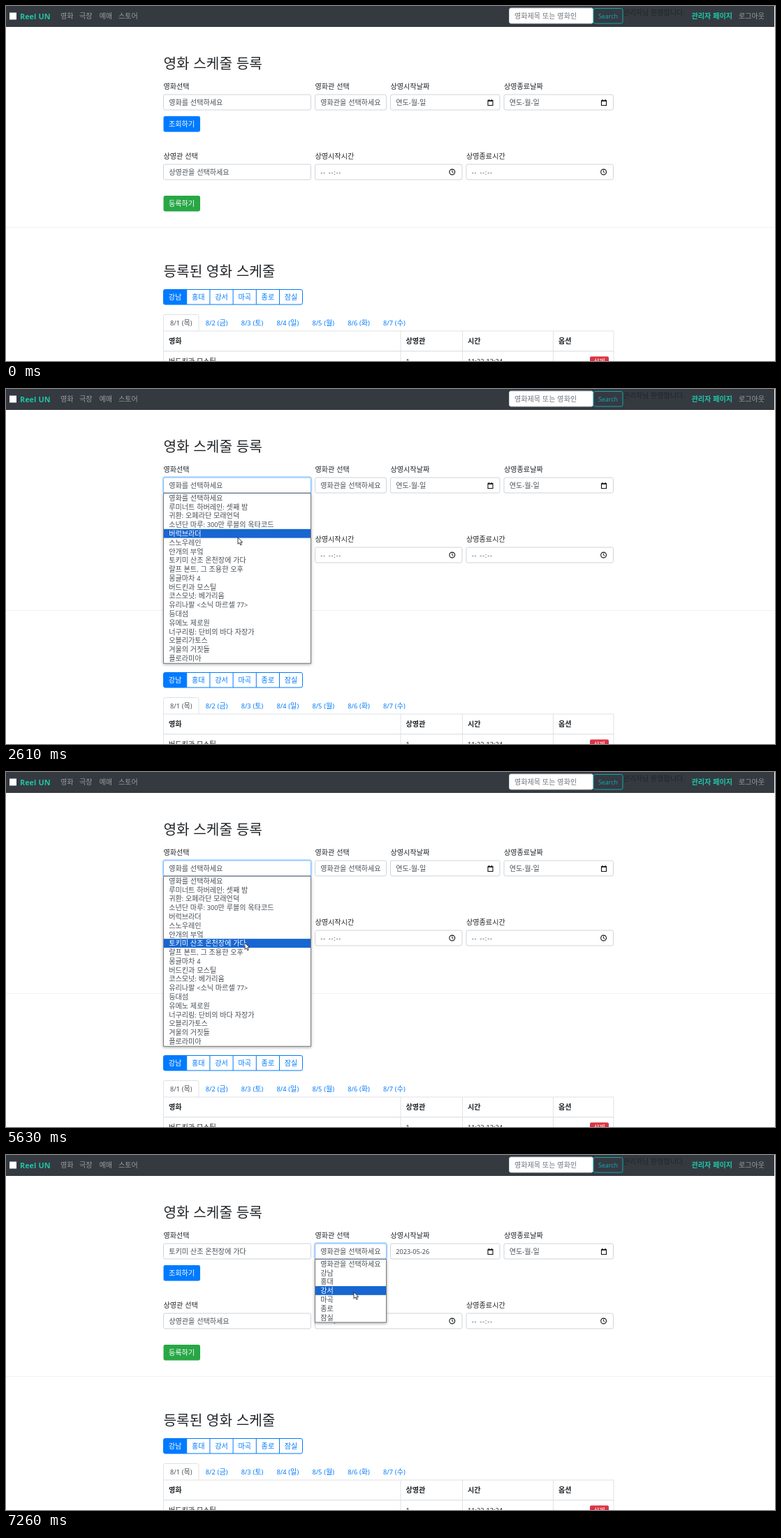
An HTML page for the animation above (8000 ms loop, 1101x509 px).

```html
<!DOCTYPE html>
<html lang="ko">
<head>
<meta charset="utf-8">
<title>영화 스케줄 등록</title>
<style>
  html, body { margin: 0; width: 100%; height: 100%; overflow: hidden; background: #fff; }
  svg { display: block; width: 100%; height: 100%; }
  text { font: 10.1px "Noto Sans CJK KR", "Noto Sans CJK", sans-serif; white-space: pre; }
  .latin { font-family: "Noto Sans", sans-serif; font-size: .91em; }
  .field { fill: #fff; stroke: #ced4da; }
  .ring { fill: none; stroke: rgba(0, 123, 255, .25); stroke-width: 2; }
  .focus .field { stroke: #80bdff; }
  .field-box:not(.focus) .ring { display: none; }
  .popup { filter: drop-shadow(0 1px 2px rgba(0, 0, 0, .35)); }
  .row rect { fill: none; }
  .row text { fill: #495057; }
  .row.on rect { fill: #1766d1; }
  .row.on text { fill: #fff; }
</style>
</head>
<body>
<svg id="stage" viewBox="0 0 1101 509" xmlns="http://www.w3.org/2000/svg"></svg>
<script>
const stage = document.getElementById('stage');
const INK = '#212529', GRAY = '#495057', NAV = '#999da0', BLUE = '#007bff', TEAL = '#20c4a8', LINE = '#dee2e6';

function add(tag, attrs = {}, parent = stage) {
  const el = document.createElementNS(stage.namespaceURI, tag);
  for (const key in attrs) el.setAttribute(key, attrs[key]);
  return parent.appendChild(el);
}

// Latin runs use a slightly smaller face than Hangul runs.
function setText(el, str) {
  el.textContent = '';
  str.split(/([\w\/().:<>,-]+)/).filter(Boolean).forEach(part => {
    const span = add('tspan', /[\w\/().:<>,-]/.test(part) ? { class: 'latin' } : {}, el);
    span.textContent = part;
  });
}

// Places text by its left edge and vertical centre.
function label(str, x, cy, { fill = GRAY, size = 10.1, weight = 400, gap = 0, anchor = 'start', parent = stage } = {}) {
  const el = add('text', {
    x, y: cy + size * .37, fill, 'text-anchor': anchor,
    style: `font-size:${size}px;font-weight:${weight};letter-spacing:${gap}px`
  }, parent);
  setText(el, str);
  return el;
}

const box = (x, y, width, height, fill, rx = 0, extra = {}, parent = stage) =>
  add('rect', { x, y, width, height, fill, rx, ...extra }, parent);
const line = (d, stroke = LINE, width = 1, extra = {}) =>
  add('path', { d, stroke, 'stroke-width': width, fill: 'none', ...extra });

function field(x, right, y, str, gap = 0) {
  const g = add('g', { class: 'field-box' });
  box(x - 1, y - 1, right - x + 2, 24, 'none', 3.2, { class: 'ring' }, g);
  box(x, y, right - x, 22, '#fff', 2.4, { class: 'field' }, g);
  return { g, text: label(str, x + 7.7, y + 11, { gap, parent: g }) };
}

function button(str, y, fill) {
  box(225.5, y, 52.5, 22.5, fill, 2.4);
  label(str, 233, y + 11.2, { fill: '#fff' });
}

function calendar(x) {
  line(`M${x + .5} 135.5h7v7h-7zM${x} 136.3h8M${x + 2} 133.8v2M${x + 6} 133.8v2`, '#111', 1.1);
}

function clock(x) {
  add('circle', { cx: x, cy: 238, r: 3.9, fill: 'none', stroke: '#111', 'stroke-width': 1.1 });
  line(`M${x} 235.6v2.6l1.8 1.2`, '#111');
}

function popup(x, width, items) {
  const step = 12.78, height = items.length * step + 1;
  const g = add('g', { class: 'popup' });
  box(x, 149.5, width, height, '#fff', 0, { stroke: '#777a7d' }, g);
  const rows = items.map((str, i) => {
    const y = 149.7 + i * step, row = add('g', { class: 'row' }, g);
    box(x + .5, y, width - 1, step, 'none', 0, {}, row);
    const text = label(str, x + 7.7, y + 6.4, { parent: row });
    text.removeAttribute('fill');
    return row;
  });
  return (open, active) => {
    g.style.display = open ? '' : 'none';
    rows.forEach((row, i) => row.classList.toggle('on', i === active - 1));
  };
}

const pickMovie = '영화를 선택하세요', pickCinema = '영화관을 선택하세요', noDate = '연도-월-일';
const cinemas = ['강남', '홍대', '강서', '마곡', '종로', '잠실'];
const movies = ['루미너트 하버레인: 셋째 밤', '귀환: 오페라단 모래언덕', '소년단 마루: 300만 루블의 옥타코드',
  '버럭브라더', '스노우레인', '안개의 부엌', '토키미 산조 온천장에 가다', '랄프 본트, 그 조용한 오후',
  '몽글마차 4', '버드킨과 모스틸', '코스모넛: 베가리움', '유리나팔 <소닉 마르셀 77>', '등대섬',
  '유메노 제로원', '너구리링: 단비의 바다 자장가', '오블리가토스', '겨울의 거짓들', '플로라미아'];

// Navigation bar
box(0, 0, 1100, 30, '#343a40');
box(5, 9.5, 10, 10, '#fff');
label('Reel UN', 20, 14.3, { fill: TEAL, size: 11.9, weight: 700 });
[['영화', 78], ['극장', 105], ['예매', 133.5], ['스토어', 161], ['로그아웃', 1049]]
  .forEach(([str, x]) => label(str, x, 14, { fill: NAV }));
label('관리자님 환영합니다.', 883.5, 9, { fill: INK, size: 10 });
box(720.5, 3, 120, 22, '#fff', 2.4, { stroke: '#ced4da' });
label('영화제목 또는 영화인', 728, 14, { fill: '#6c757d' });
box(841, 3.5, 42, 21.5, '#343a40', 2.4, { stroke: '#17a2b8' });
label('Search', 848, 14, { fill: '#17a2b8', size: 9.7 });
label('관리자 페이지', 981.5, 14, { fill: TEAL, weight: 700 });

// Registration form
label('영화 스케줄 등록', 225.5, 83, { fill: INK, size: 20.2 });
[['영화선택', 225.5, 115], ['영화관 선택', 442.5, 115], ['상영시작날짜', 550.5, 115], ['상영종료날짜', 713, 115],
 ['상영관 선택', 225.5, 215], ['상영시작시간', 442.5, 215], ['상영종료시간', 659, 215]]
  .forEach(([str, x, y]) => label(str, x, y, { fill: INK }));
const movieField = field(225.5, 436.5, 127, pickMovie);
const cinemaField = field(442.5, 544.5, 127, pickCinema);
const startField = field(550.5, 707, 127, noDate);
field(713, 869.5, 127, noDate);
calendar(689.5);
calendar(852);
button('조회하기', 158, BLUE);
field(225.5, 436.5, 227, '상영관을 선택하세요');
field(442.5, 653, 227, '-- --:--', .9);
field(659, 869.5, 227, '-- --:--', .9);
clock(638.8);
clock(855.6);
button('등록하기', 272, '#28a745');
line('M0 317.5H1100', '#f0f0f0');

// Registered schedule
label('등록된 영화 스케줄', 225.5, 380.5, { fill: INK, size: 20.2 });
box(225.5, 406.5, 199, 21.5, '#fff', 2.4, { stroke: BLUE });
box(225.5, 406.5, 33.2, 21.5, BLUE, 2);
cinemas.forEach((str, i) => {
  const x = 225.5 + i * 33.2;
  if (i) line(`M${x} 406.5v21.5`, BLUE);
  label(str, x + 16.6, 417.3, { fill: i ? BLUE : '#fff', anchor: 'middle' });
});
line('M225.5 466V445q0-2.5 2.5-2.5H273.5q2.5 0 2.5 2.5V466H870');
[...'목금토일월화수'].forEach((day, i) =>
  label(`8/${i + 1} (${day})`, 235 + i * 50.85, 454.3, { fill: i ? BLUE : GRAY }));
line('M225.5 466V509M565 466V509M653.5 466V509M783.5 466V509M870 466V509M225.5 466H276');
line('M225.5 494.8H870', LINE, 1.3);
[['영화', 233], ['상영관', 572.5], ['시간', 661], ['옵션', 791]]
  .forEach(([str, x]) => label(str, x, 480.5, { fill: INK, weight: 700 }));
[[movies[9], 233], ['1', 572.5], ['11:22-13:24', 661]]
  .forEach(([str, x]) => label(str, x, 509, { fill: INK }));
box(836, 502.5, 27, 18, '#dc3545', 2);
label('삭제', 841.5, 510, { fill: '#fff', size: 8.8 });

const showMovies = popup(225.5, 211, [pickMovie, ...movies]);
const showCinemas = popup(442.5, 102, [pickCinema, ...cinemas]);
const cursor = add('path', {
  d: 'M0 0V9.3L2.2 7.4L3.8 10.8L5.3 10.1L3.8 6.8H6.7Z',
  fill: '#fff', stroke: '#111', 'stroke-width': .8, 'stroke-linejoin': 'round'
});

// Stepped tracks: each entry holds until the next one.
const movieRow = [[0, 1], [1000, 4], [1110, 5], [1390, 6], [1710, 5], [2710, 6], [2810, 7], [3110, 8], [4320, 7], [5630, 8]];
const cinemaRow = [[0, 1], [6940, 2], [7050, 3], [7150, 4]];
const stops = [[800, 336, 141], [900, 335, 160], [1000, 334, 204], [1110, 333, 209], [1290, 333, 216], [1390, 333, 222],
  [1710, 332, 212], [2610, 332, 213], [2710, 335, 228], [2810, 339, 238], [3110, 340.5, 242], [3810, 340.5, 241],
  [3910, 340.5, 240], [4010, 340.5, 241.5], [4320, 340.5, 240], [4530, 341, 238.5], [5630, 342, 245]];
const glides = [
  { from: 100, to: 800, steps: 7, a: [1008, 466], b: [336, 141] },
  { from: 5940, to: 6360, steps: 4, a: [342, 245], b: [488, 138] },
  { from: 6360, to: 6640, steps: 3, a: [488, 138], b: [491, 146] },
  { from: 6740, to: 7260, steps: 5, a: [491, 146], b: [498, 196.5] }
];
const hold = (track, t) => track.reduce((last, entry) => entry[0] <= t ? entry : last);

function cursorAt(t) {
  const glide = glides.filter(g => g.from <= t).pop();
  if (!glide || (t >= 800 && t < 5940)) return hold(stops, t).slice(1);
  const { from, to, steps, a, b } = glide;
  const p = Math.min(1, Math.floor((t - from) / (to - from) * steps + .01) / steps);
  const eased = p * p * (3 - 2 * p);
  return a.map((v, i) => v + (b[i] - v) * eased);
}

function change(el, str) {
  if (el.textContent !== str) setText(el, str);
}

function draw() {
  const t = performance.now() % 8000;
  showMovies(t >= 800 && t < 5730, hold(movieRow, t)[1]);
  showCinemas(t >= 6540, hold(cinemaRow, t)[1]);
  movieField.g.classList.toggle('focus', t >= 800 && t < 6440);
  cinemaField.g.classList.toggle('focus', t >= 6440);
  change(movieField.text, t < 5730 ? pickMovie : movies[6]);
  change(startField.text, t < 5840 ? noDate : '2023-05-26');
  cursor.style.display = t < 100 ? 'none' : '';
  cursor.setAttribute('transform', `translate(${cursorAt(t)})`);
  requestAnimationFrame(draw);
}
draw();
</script>
</body>
</html>
```
